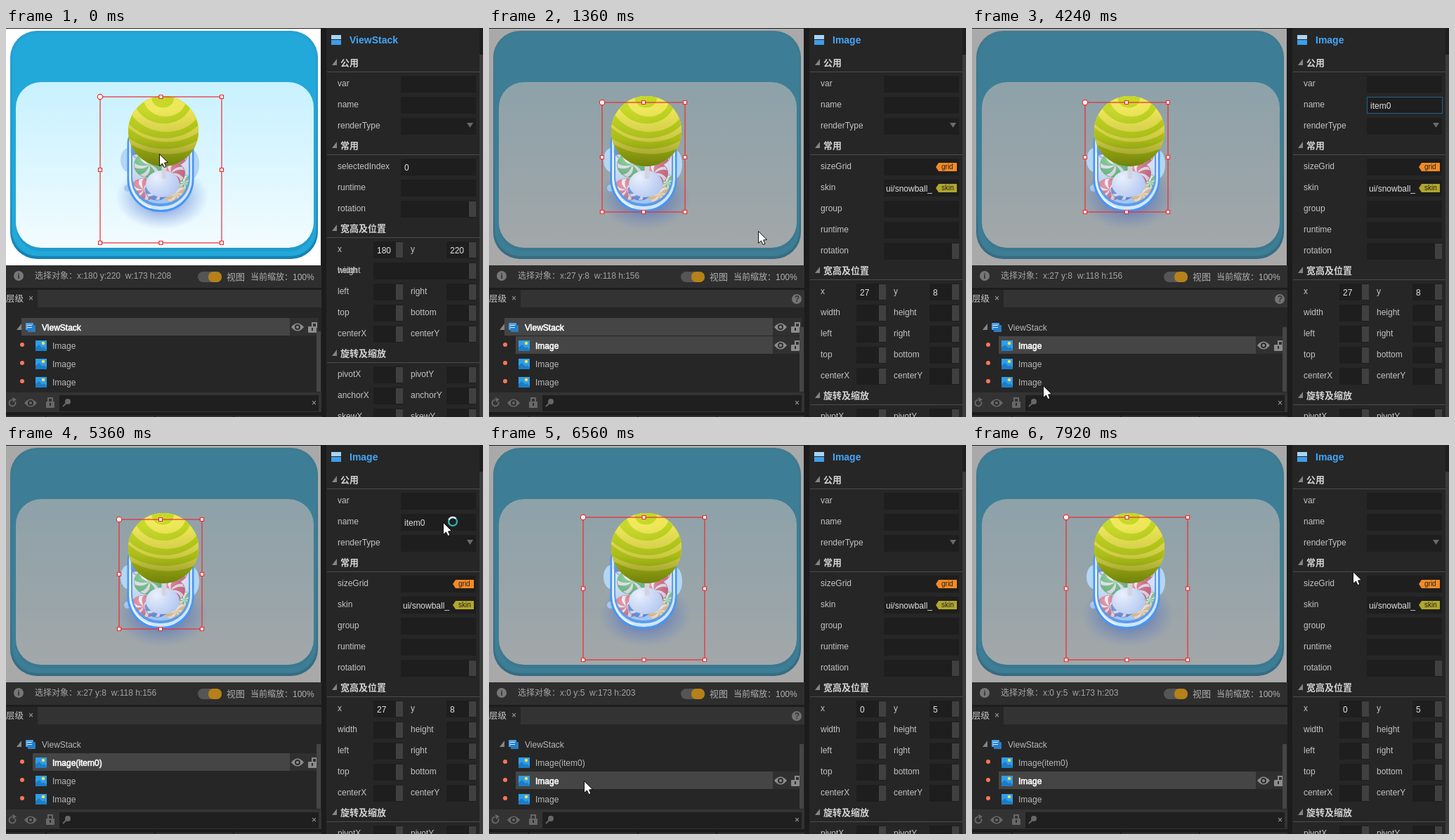
These frames come from a looping animation (679 by 554 pixels, 8000 ms). An HTML page with a canvas:

```html
<!DOCTYPE html>
<html lang="zh-CN">
<head>
<meta charset="utf-8">
<title>ViewStack editor</title>
<style>
html, body { margin: 0; width: 100%; height: 100%; overflow: hidden; background: #262626; }
canvas { display: block; }
</style>
</head>
<body>
<canvas id="stage" width="679" height="554"></canvas>
<script>
const ctx = document.getElementById('stage').getContext('2d');
const LOOP = 8000, STEP = 80;
const FONT = '"Liberation Sans", "Noto Sans CJK SC", "Noto Sans CJK", sans-serif';
const LABEL = '#c4c4c4', FIELD = '#1e1e1e', GRIP = '#404040', ICON = '#8c8c8c';

// Pointer way points: time, x, y
const POINTER = [
  [0, 218, 179], [240, 218, 179], [960, 97, 458], [1040, 97, 458], [1360, 383, 289],
  [1920, 598, 108], [3600, 598, 108], [4160, 130, 497], [4400, 104, 479], [4720, 104, 479],
  [5360, 622, 110], [5520, 626, 109], [5760, 626, 109], [6320, 141, 495], [6560, 135, 478],
  [6800, 135, 478], [7120, 185, 500], [7360, 205, 485], [7600, 205, 479], [7680, 205, 479],
  [7920, 542, 180], [8000, 542, 180]
];

// The three selectable targets with bounds on the stage
const TARGETS = [
  { title: 'ViewStack', box: [134, 98, 307, 306], x: 180, y: 220, w: 173, h: 208 },
  { title: 'Image', box: [161, 106, 279, 262], x: 27, y: 8, w: 118, h: 156 },
  { title: 'Image', box: [134, 103, 307, 306], x: 0, y: 5, w: 173, h: 203 }
];

function rect(x, y, w, h, color) {
  ctx.fillStyle = color;
  ctx.fillRect(x, y, w, h);
}
function round(x, y, w, h, r, color) {
  ctx.beginPath();
  ctx.roundRect(x, y, w, h, r);
  ctx.fillStyle = color;
  ctx.fill();
}
function ellipse(x, y, rx, ry, color, turn = 0) {
  ctx.beginPath();
  ctx.ellipse(x, y, rx, ry, turn, 0, 2 * Math.PI);
  ctx.fillStyle = color;
  ctx.fill();
}
function path(points, color, line) {
  ctx.beginPath();
  points.forEach(([x, y]) => ctx.lineTo(x, y));
  ctx.closePath();
  ctx.fillStyle = color;
  ctx.fill();
  if (line) { ctx.strokeStyle = line; ctx.lineWidth = 1; ctx.stroke(); }
}
function text(s, x, y, color = LABEL, size = 12, weight = '') {
  ctx.font = `${weight} ${size}px ${FONT}`;
  ctx.fillStyle = color;
  ctx.fillText(s, x, y);
}
function vertical(y0, y1, ...colors) {
  const g = ctx.createLinearGradient(0, y0, 0, y1);
  colors.forEach((c, i) => g.addColorStop(i / (colors.length - 1), c));
  return g;
}
function radial(x, y, r, inner, outer) {
  const g = ctx.createRadialGradient(x, y, 0, x, y, r);
  g.addColorStop(0, inner);
  g.addColorStop(1, outer);
  return g;
}

function pointerAt(t) {
  let i = 0;
  while (i < POINTER.length - 2 && POINTER[i + 1][0] <= t) i++;
  const a = POINTER[i], b = POINTER[i + 1], d = b[0] - a[0], u = (t - a[0]) / d;
  const slope = (k, c) => {
    const p = POINTER[k - 1], q = POINTER[k], n = POINTER[k + 1];
    if (!p || !n) return 0;
    const still = (m, o) => m[1] === o[1] && m[2] === o[2];
    return still(p, q) || still(q, n) ? 0 : (n[c] - p[c]) / (n[0] - p[0]);
  };
  return [1, 2].map(c =>
    (2 * u ** 3 - 3 * u * u + 1) * a[c] + (u ** 3 - 2 * u * u + u) * d * slope(i, c) +
    (3 * u * u - 2 * u ** 3) * b[c] + (u ** 3 - u * u) * d * slope(i + 1, c));
}

// ---- Stage artwork ----
function drawBackdrop() {
  rect(0, 1, 448, 337, '#fff');
  round(6, 4, 438, 325, 38, vertical(4, 329, '#2a9fcd', '#2499c8', '#1682b2'));
  round(8, 6, 434, 319, 37, '#22a5d6');
  round(10, 8, 430, 315, 36, '#22a8d9');
  round(14, 82, 424, 236, 36, '#1e9ccd');
  round(14, 77, 424, 236, 36, vertical(77, 313, '#c8f1ff', '#dcf6ff', '#f3fcff'));
}
function drawSnow() {
  const pale = '#b3d6f3';
  ellipse(174, 188, 11, 17, pale);
  ellipse(265, 194, 10, 20, pale);
  ellipse(173, 228, 5, 5, pale);
}
function candy(x, y, r, color) {
  const wedges = 6, step = 2 * Math.PI / wedges;
  ellipse(x, y, r, r * .85, color);
  for (let i = 0; i < wedges; i++) {
    const at = (k, s) => {
      const a = i * step + x + s;
      return [x + k * r * Math.cos(a), y + k * r * .85 * Math.sin(a)];
    };
    ctx.beginPath();
    ctx.moveTo(x, y);
    ctx.quadraticCurveTo(...at(.6, -.6), ...at(.97, 0));
    ctx.lineTo(...at(.97, .36));
    ctx.quadraticCurveTo(...at(.65, -.1), x, y);
    ctx.fillStyle = '#f6eef2';
    ctx.fill();
  }
  ellipse(x, y, r, r * .85, radial(x - r * .3, y - r * .4, r * 1.3, 'rgba(255,255,255,.3)', 'rgba(40,30,90,.22)'));
}
function drawJar(front) {
  ctx.save();
  ctx.translate(0, 76);
  ctx.scale(1, .7);
  ellipse(222, 236, 66, 66, radial(222, 236, 66, 'rgba(38,78,185,.75)', 'rgba(70,110,210,0)'));
  ctx.restore();
  round(172.5, 140, 95, 122, [24, 24, 46, 46], '#4795f5');
  round(175, 140, 90, 119, [22, 22, 44, 44], '#cfe6fb');
  round(178, 140, 84, 114, [20, 20, 40, 40], '#5b9cec');
  ctx.save();
  ctx.beginPath();
  ctx.roundRect(180, 142, 80, 108, [18, 18, 38, 38]);
  ctx.fillStyle = vertical(142, 250, '#dbe3f3', '#cfd9ee', '#7fb4ee');
  ctx.fill();
  ctx.clip();
  candy(240, 180, 19, '#e2426f');
  candy(197, 172, 20, '#2d66d6');
  candy(196, 230, 19, '#dd4253');
  candy(254, 221, 14, '#36b445');
  candy(242, 237, 16, '#eeb13c');
  candy(215, 231, 17, '#2c6cd8');
  candy(235, 207, 20, '#d9304a');
  candy(204, 195, 22, '#35b545');
  if (!front) rect(170, 140, 100, 120, 'rgba(226,236,248,.3)');
  ctx.restore();
  ctx.strokeStyle = 'rgba(255,255,255,.6)';
  ctx.lineWidth = 2;
  ctx.beginPath();
  ctx.moveTo(177, 178);
  ctx.lineTo(177, 218);
  ctx.quadraticCurveTo(181, 248, 206, 256);
  ctx.stroke();
  ellipse(219, 147, 42, 33, vertical(130, 180, '#c79063', '#ad7347'));
  ellipse(219, 135, 42, 32, vertical(103, 167, '#d59b6d', '#dba679'));
}
function drawLolly() {
  ellipse(223, 222, 24, 19, radial(214, 213, 36, '#e9f0fd', '#b2c6f0'));
  round(221.5, 190, 7, 25, 3, '#d5d3df');
  ctx.save();
  ctx.beginPath();
  ctx.arc(224, 147, 50, 0, 2 * Math.PI);
  ctx.clip();
  rect(170, 95, 110, 105, '#b4c81a');
  // Nested tilted rings, thicker on the left side
  const rings = [88, 80, 69, 63, 53, 40, 29, 15];
  rings.forEach((r, i) =>
    ellipse(226 - i % 2 * 3, 100, r * 1.05, r * .9, i % 2 ? '#bdd31c' : '#ede556', .14));
  ellipse(210, 118, 60, 60, radial(210, 118, 60, 'rgba(255,250,120,.2)', 'rgba(255,250,120,0)'));
  rect(170, 95, 110, 105, vertical(115, 198, 'rgba(80,90,0,0)', 'rgba(85,95,0,.2)', 'rgba(65,80,0,.6)'));
  ctx.restore();
}
function drawSelection([x0, y0, x1, y1]) {
  ctx.strokeStyle = '#f0282d';
  ctx.lineWidth = 1.2;
  ctx.strokeRect(x0, y0, x1 - x0, y1 - y0);
  const xs = [x0, (x0 + x1) / 2, x1], ys = [y0, (y0 + y1) / 2, y1];
  xs.forEach((x, i) => ys.forEach((y, j) => {
    if (i === 1 && j === 1) return;
    ctx.beginPath();
    if (i + j) ctx.rect(x - 2.5, y - 2.5, 5, 5);
    else ctx.arc(x, y, 3.7, 0, 2 * Math.PI);
    ctx.fillStyle = '#fff';
    ctx.fill();
    ctx.stroke();
  }));
}
function drawStage(sel, peek) {
  ctx.save();
  ctx.beginPath();
  ctx.rect(0, 1, 448, 337);
  ctx.clip();
  drawBackdrop();
  if (peek) { drawSnow(); drawLolly(); }
  if (sel) rect(0, 0, 448, 338, 'rgba(86,86,86,.51)');
  if (!peek) drawSnow();
  drawJar(peek);
  if (!peek) { drawLolly(); drawSelection(TARGETS[sel].box); }
  ctx.restore();
}

// ---- Icons ----
function eye(x, y, color = ICON) {
  ctx.beginPath();
  ctx.moveTo(x - 9, y);
  ctx.quadraticCurveTo(x, y - 11, x + 9, y);
  ctx.quadraticCurveTo(x, y + 11, x - 9, y);
  ctx.fillStyle = color;
  ctx.fill();
  ellipse(x, y, 4, 4, '#2d2d2d');
  ellipse(x, y, 2, 2, color);
}
function lock(x, y, color = ICON, shift = 0) {
  round(x - 6, y - 2, 12, 9, 1, color);
  ctx.strokeStyle = color;
  ctx.lineWidth = 2;
  ctx.strokeRect(x - 3 + shift, y - 7, 6, 6);
  rect(x - 1, y, 2, 4, '#2d2d2d');
}
function fold(x, y) {
  path([[x + 7, y - 5], [x + 7, y + 4], [x, y + 4]], '#858585');
}
function imageIcon(x, y) {
  rect(x, y, 16, 15, '#2f9ee8');
  path([[x, y + 15], [x, y + 10], [x + 5, y + 6], [x + 10, y + 11], [x + 12, y + 9], [x + 16, y + 13], [x + 16, y + 15]], '#1c7cc6');
  ellipse(x + 11, y + 4, 2.3, 2.3, '#f0e04e');
}

// ---- Left panels ----
function drawStatus(sel, peek) {
  rect(0, 338, 450, 32, '#2e2e2e');
  rect(0, 370, 450, 3, '#1d1d1d');
  ellipse(18, 353, 7, 7, '#777');
  text('i', 16.4, 357, '#2e2e2e', 11, 'bold');
  const s = TARGETS[sel];
  text(peek ? '使用右键拖动视窗，使用滚轮缩放视窗，Ctrl+0可恢复缩放'
    : `选择对象：x:${s.x} y:${s.y}  w:${s.w} h:${s.h}`, 41, 357, '#a3a3a3');
  round(273, 347, 34, 15, 7.5, '#555');
  round(288, 347, 19, 15, 7, '#b58118');
  text('视图', 314, 359, '#b0b0b0', 13);
  text('当前缩放：100%', 348, 359, '#b0b0b0');
}
function treeRow(y, x, label, active, color) {
  if (active) {
    rect(x, y - 13, 404 - x, 25, color);
    rect(404, y - 13, 41, 25, '#303030');
    eye(415, y);
    lock(436, y + 1, ICON, 3);
  }
  const tx = x === 22 ? 51 : 66;
  text(label, tx, y + 5, active ? '#fff' : '#b9b9b9');
  if (active) {
    ctx.strokeStyle = '#fff';
    ctx.lineWidth = .6;
    ctx.strokeText(label, tx, y + 5);
  }
}
function drawTree(sel, peek, t) {
  rect(0, 373, 450, 146, '#262626');
  rect(45, 373, 405, 25, '#333');
  text('层级', 0, 390, '#c8c8c8', 12.5);
  text('×', 32, 389, '#aaa', 12);
  const help = (t >= 1120 && t < 1440) || (t >= 4160 && t < 4960) || (t >= 6320 && t < 7840);
  if (help) {
    ellipse(438, 386, 7, 7, '#737373');
    text('?', 434.7, 390, '#333', 12, 'bold');
  }
  treeRow(426, 22, 'ViewStack', t < 1440, '#454545');
  fold(15, 426);
  round(28, 420, 11, 10, 1, '#48a2ea');
  round(31, 423, 11, 10, 1, '#2a7cc4');
  rect(30, 423, 7, 1, '#d5eafa');
  rect(30, 426, 7, 1, '#d5eafa');
  [0, 1, 2].forEach(i => {
    const y = 452 + 26 * i, label = i === 0 && t >= 4320 ? 'Image(item0)' : 'Image';
    treeRow(y, 38, label, sel === i + 1, peek ? '#363636' : '#454545');
    ellipse(23, y - 1, 3, 3, '#ff7659');
    imageIcon(42, y - 7);
  });
  rect(442, sel ? 426 : 432, 6, sel ? 92 : 86, '#454545');
}
function drawToolbar() {
  const dim = '#686868';
  rect(0, 519, 450, 28, '#333');
  rect(76, 523, 369, 23, '#1f1f1f');
  ctx.strokeStyle = dim;
  ctx.lineWidth = 2;
  ctx.beginPath();
  ctx.arc(9, 534, 4.5, -.4, 4.6);
  ctx.stroke();
  path([[9, 526], [15, 529], [10, 533]], dim);
  eye(35, 534, dim);
  lock(63, 534, dim);
  ellipse(88, 532, 4, 4, dim);
  ctx.beginPath();
  ctx.moveTo(86, 534);
  ctx.lineTo(81, 539);
  ctx.stroke();
  text('×', 435, 538, '#aaa');
  rect(0, 547, 456, 7, '#1c1c1c');
  [[0, 56], [58, 153], [213, 110], [325, 125]].forEach(([x, w]) => rect(x, 552, w, 2, '#303030'));
}

// ---- Property panel ----
function field(x, y, w, grip) {
  rect(x, y - 11, w, 24, FIELD);
  if (grip) rect(x + w - 10, y - 10, 10, 22, GRIP);
}
function header(label, y) {
  fold(464, y);
  text(label, 476, y + 5, '#d2d2d2', 13, 'bold');
  rect(457, y + 13, 217, 1, '#4c4c4c');
}
function row(label, y, grip) {
  text(label, 472, y + 4);
  field(562, y, 107, grip);
}
function pair(a, b, y, va = '', vb = '') {
  text(a, 472, y + 4);
  field(523, y, 42, true);
  text(b, 576, y + 4);
  field(627, y, 42, true);
  text(va, 528, y + 6, '#e2e2e2');
  text(vb, 632, y + 6, '#e2e2e2');
}
function tag(label, y, color) {
  path([[636, y], [640, y - 6], [666, y - 6], [666, y + 6], [640, y + 6]], color);
  text(label, 644, y + 3, '#222', 10);
}
function drawName(t) {
  const focus = (t >= 2000 && t < 4320) || (t >= 5520 && t < 6240);
  const name = t < 2400 || t >= 6400 ? '' : t < 3520 ? 'item' : 'item0';
  text(name, 567, 115, '#e0e0e0');
  if (!focus) return;
  ctx.strokeStyle = '#24618c';
  ctx.lineWidth = 1;
  ctx.strokeRect(562.5, 98.5, 107, 23);
  const caret = (t >= 2400 && t < 2800) || (t >= 3280 && t < 3680);
  if (caret) rect(Math.round(567 + ctx.measureText(name).width), 103, 1, 14, '#ddd');
}
function drawProperties(sel, t) {
  const s = TARGETS[sel], shift = sel ? 60 : 0;
  rect(450, 0, 229, 554, '#262626');
  rect(449, 0, 7, 554, '#1c1c1c');
  rect(674, 0, 5, 554, '#1f1f1f');
  rect(674, 38, 5, 516, '#3b3b3b');
  rect(463, 10, 14, 6, '#a9d5f6');
  rect(463, 17, 14, 7, '#3f9de8');
  text(s.title, 489, 22, '#45a6f5', 14, 'bold');
  header('公用', 49);
  ['var', 'name', 'renderType'].forEach((l, i) => row(l, 79 + 30 * i));
  path([[656, 135], [665, 135], [660.5, 142]], '#6b6b6b');
  drawName(t);
  header('常用', 167);
  const common = sel ? ['sizeGrid', 'skin', 'group', 'runtime', 'rotation'] : ['selectedIndex', 'runtime', 'rotation'];
  common.forEach((l, i) => row(l, 197 + 30 * i, l === 'rotation'));
  if (sel) {
    text('ui/snowball_', 565, 233, '#e0e0e0');
    tag('grid', 198, '#f58a25');
    tag('skin', 228, '#b1a62d');
  } else {
    text('0', 567, 203, '#e2e2e2');
  }
  header('宽高及位置', 285 + shift);
  pair('x', 'y', 315 + shift, s.x, s.y);
  if (sel) {
    pair('width', 'height', 405);
  } else {
    text('width', 472, 349);
    text('height', 472, 349);
    field(523, 345, 146, true);
  }
  pair('left', 'right', 375 + shift);
  pair('top', 'bottom', 405 + shift);
  pair('centerX', 'centerY', 435 + shift);
  header('旋转及缩放', 463 + shift);
  ['pivot', 'anchor', 'skew'].forEach((l, i) => pair(l + 'X', l + 'Y', 493 + shift + 30 * i));
}

// ---- Pointer ----
function drawPointer(t) {
  const [x, y] = pointerAt(t).map(Math.round);
  const typing = (t >= 2080 && t < 3760) || (t >= 5520 && t < 5840);
  if (typing) {
    const bx = t < 2880 ? x - 1 : x;
    rect(bx - 3, y - 9, 7, 1, '#eee');
    rect(bx - 3, y + 6, 7, 1, '#eee');
    rect(bx, y - 8, 1, 14, '#eee');
    return;
  }
  const arrow = [[0, 0], [0, 17], [4, 13.5], [6.5, 19], [9.5, 18], [7, 12.5], [12, 12]];
  path(arrow.map(([dx, dy]) => [x + dx + .5, y + dy + .5]), '#fff', '#111');
  if (t >= 5200 && t < 5520) {
    const ring = (color, from, to) => {
      ctx.strokeStyle = color;
      ctx.beginPath();
      ctx.arc(x + 14, y - 1, 6, from, to);
      ctx.stroke();
    };
    ctx.lineWidth = 2.4;
    ring('#2fb0ae', 0, 2 * Math.PI);
    ring('#d8f1f1', t / 130, t / 130 + 2);
  }
}

function frame(now) {
  const t = Math.floor(now % LOOP / STEP) * STEP;
  const sel = t < 1120 ? 0 : t < 6400 ? 1 : 2;
  const peek = t >= 7120 && t < 7520;
  rect(0, 0, 679, 554, '#1c1c1c');
  drawStage(sel, peek);
  drawStatus(sel, peek);
  drawTree(sel, peek, t);
  drawToolbar();
  drawProperties(sel, t);
  drawPointer(t);
}

const start = performance.now();
(function tick() {
  frame(performance.now() - start);
  requestAnimationFrame(tick);
})();
</script>
</body>
</html>
```
